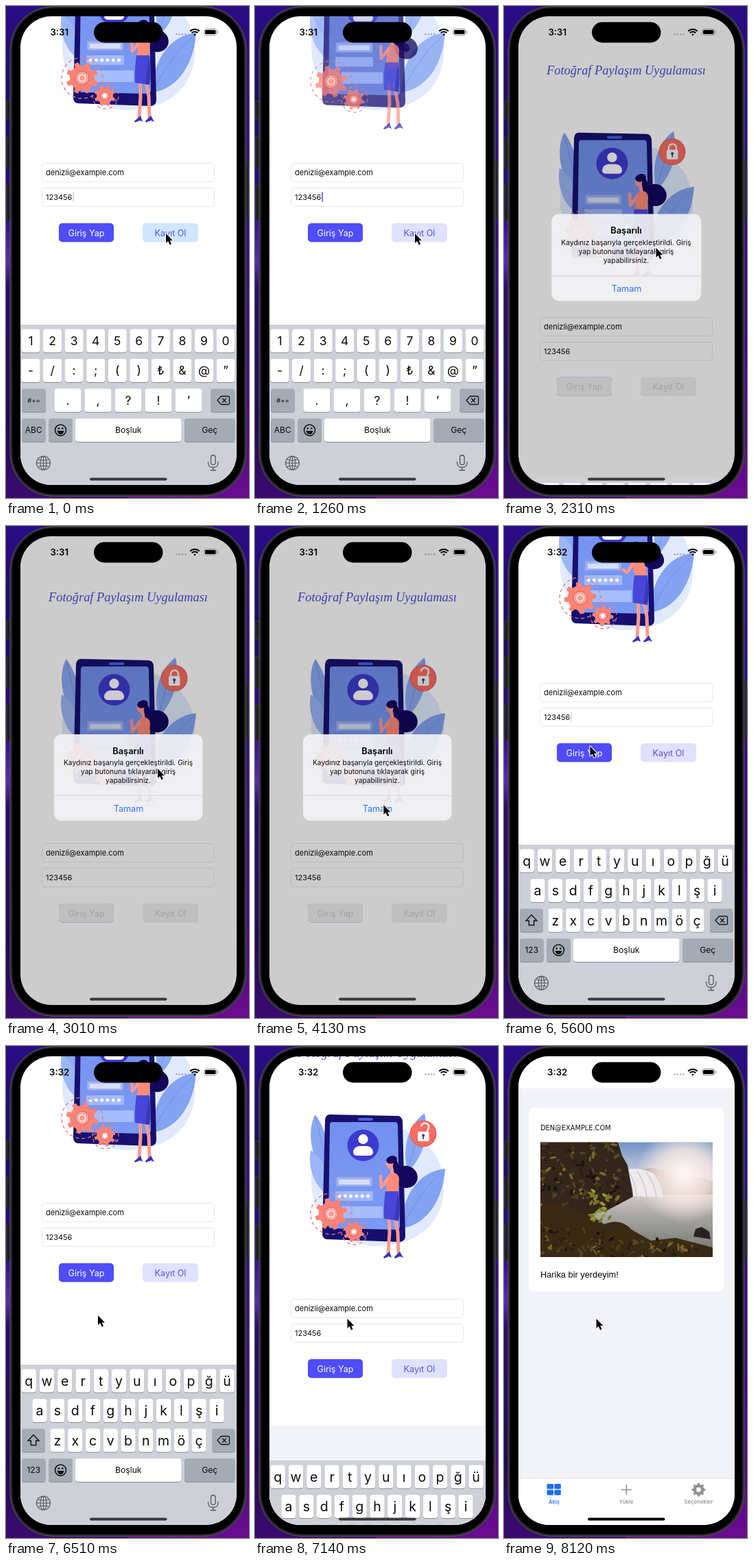
An HTML page with a canvas that plays this animation: 354x718 px, repeating every 8190 ms.

```html
<!DOCTYPE html>
<html lang="tr">
<head>
<meta charset="utf-8">
<title>Giriş</title>
<style>
html, body { margin: 0; width: 100%; height: 100%; overflow: hidden; background: #14063f; }
canvas { display: block; width: 354px; height: 718px; }
</style>
</head>
<body>
<canvas id="c"></canvas>
<script>
const W = 354, H = 718, LOOP = 8190, TRAVEL = 234;
const ALERT_IN = 2030, ALERT_OUT = 4684, LEAVE = 7028, FEED_IN = 7082, CARD = 7490, PHOTO = 7630;
const canvas = document.getElementById('c');
const dpr = window.devicePixelRatio || 1;
canvas.width = W * dpr;
canvas.height = H * dpr;
const g = canvas.getContext('2d');

const clamp = v => Math.max(0, Math.min(1, v));
const ramp = (t, a, b) => clamp((t - a) / (b - a));
const smooth = (t, a, b) => { const k = ramp(t, a, b); return k * k * (3 - 2 * k); };
const mix = (a, b, k) => a + (b - a) * k;
// share of the way still to go, ms after the start
const spring = ms => { const u = Math.max(0, ms) * 0.018; return (1 + u) * Math.exp(-u); };

function paint(fill, stroke, lw = 1) {
  if (fill) { g.fillStyle = fill; g.fill(); }
  if (stroke) { g.strokeStyle = stroke; g.lineWidth = lw; g.stroke(); }
}
function box(x, y, w, h, r, fill, stroke, lw = 1) {
  g.beginPath();
  g.roundRect(x, y, w, h, r);
  paint(fill, stroke, lw);
}
function shape(d, fill, stroke, lw = 1) {
  const p = new Path2D(d);
  if (fill) { g.fillStyle = fill; g.fill(p); }
  if (stroke) { g.strokeStyle = stroke; g.lineWidth = lw; g.stroke(p); }
}
function oval(x, y, rx, ry, fill, stroke, lw = 1, rot = 0) {
  g.beginPath();
  g.ellipse(x, y, rx, ry, rot, 0, 7);
  paint(fill, stroke, lw);
}
const disc = (x, y, r, fill, stroke, lw) => oval(x, y, r, r, fill, stroke, lw);
// y is the middle of the capitals
function text(s, x, y, size, color, align = 'center', weight = 400, font = 'Inter, sans-serif') {
  g.font = `${weight} ${size}px ${font}`;
  g.textAlign = align;
  g.fillStyle = color;
  g.fillText(s, x, y + size * 0.36);
}
function at(x, y, draw) {
  g.save();
  g.translate(x, y);
  draw();
  g.restore();
}
function limb(points, width, color) {
  g.beginPath();
  points.forEach(p => g.lineTo(p[0], p[1]));
  g.lineCap = g.lineJoin = 'round';
  paint(null, color, width);
  g.lineCap = 'butt';
}
function linear(x0, y0, x1, y1, stops) {
  const s = g.createLinearGradient(x0, y0, x1, y1);
  stops.forEach(([p, c]) => s.addColorStop(p, c));
  return s;
}

function gear(x, y, r, teeth, rot, fill) {
  g.beginPath();
  for (let i = 0; i < teeth; i++) {
    [[-.27, .78], [-.17, 1], [.17, 1], [.27, .78]].forEach(([o, k]) => {
      const a = rot + (i + o) / teeth * 2 * Math.PI;
      g.lineTo(x + Math.cos(a) * r * k, y + Math.sin(a) * r * k);
    });
  }
  g.closePath();
  paint(fill);
}
function dashedRing(x, y, r, rot) {
  at(x, y, () => {
    g.rotate(rot);
    g.setLineDash([5, 4]);
    disc(0, 0, r, null, '#e07a80', 1.3);
    g.setLineDash([]);
  });
}

function woman(t) {
  const k = smooth(t, 4150, 4650) * (1 - smooth(t, 5100, 5900));
  const p = (x0, y0, x1, y1) => [mix(x0, x1, k), mix(y0, y1, k)];
  const skin = '#fb9a92', navy = '#13065c', orange = '#ff8b78';
  const head = p(197, 29, 166, 40), crown = p(200, 26, 174, 35), neck = p(200, 44, 178, 48);
  const chest = p(201, 54, 183, 56), waist = [200, 72], nape = p(207, 42, 194, 35);
  const hand = p(183, 49 + Math.sin(t / 350), 154, 95);
  const elbow = p(184, 66, 168, 73), tail = p(220, 51, 209, 42);

  limb([[195, 105], [196, 132], [194, 162]], 5, skin);
  limb([[203, 105], [208, 132], [209, 162]], 5, skin);
  shape('M196 160L187 168L188 170L195 167L199 169Z', '#3532bd');
  shape('M211 160L203 168L204 170L211 167L216 169Z', '#3532bd');
  oval(...tail, 17, mix(16, 11, k), navy, null, 1, .4);
  limb([crown, nape, tail], 11, navy);
  limb([chest, waist], 18, orange);
  shape('M190 72L209 72Q212 96 209 115L188 112Q187 90 190 72Z', '#4747d9');
  shape('M208 74Q212 96 209 115L203 114Z', '#3937bb');
  limb([p(194, 53, 177, 54), elbow, hand], 4.5, skin);
  limb([head, neck], 5, skin);
  oval(head[0] - 1, head[1] + 2, 5.5, 7, skin);
  oval(crown[0] - 1, crown[1], 8, 5.5, navy, null, 1, -.3);
}

function lock(t) {
  const open = smooth(t, 3700, 4250) + (t < 980 ? 1 : 0);
  disc(245, -12, 19.5, '#fa6d60');
  g.setLineDash([2, 2]);
  disc(245, -12, 18.5, null, '#b84a58', 1);
  g.setLineDash([]);
  at(251, -14 - 2 * open, () => {
    g.rotate(open * .45);
    shape('M0 1V-4A5.5 5.5 0 0 0 -11 -4V' + (open > .3 ? -2 : 1), null, '#f3f3fa', 2.4);
  });
  box(237, -15, 16.5, 14, 2, '#f6f6fb');
  disc(245.2, -9.5, 2, '#3b3a70');
  box(244.4, -9, 1.6, 5, 0, '#3b3a70');
}

function illustration(t) {
  const intro = ramp(t, 980, 1380);
  const live = t >= 980;
  const rise = live ? 16 * (1 - smooth(t, 980, 1680)) : 0;
  const spin = live ? Math.min(t, 7490) * .0004 : .4;
  g.save();
  shape('M82 62C80 12 120 -26 178 -24C238 -26 279 18 275 72C272 122 232 150 184 152C126 154 84 116 82 62Z', '#e1eafd');
  if (live) g.globalAlpha = .15 + .85 * intro;

  shape('M88 -40C75 -20 80 32 108 48C112 10 102 -20 88 -40Z', '#8aa8f2');
  shape('M81 12C76 42 90 72 112 80C110 46 100 24 81 12Z', '#9bb5f6');
  shape('M247 -42C222 -24 214 10 222 44C246 22 254 -12 247 -42Z', '#8aa8f2');
  shape('M277 39C244 42 214 72 213 126C250 122 274 84 277 39Z', '#83a2f1');
  shape('M272 45Q240 72 215 123M88 -36Q98 0 106 44M246 -38Q232 4 223 40', null, '#6a8ae4', .8);

  at(0, rise * .25, () => {
    shape('M109 -40L207 -38Q214 -38 215 -30L219 137Q219 145 211 146L104 142Q98 141 98 133L102 -32Q103 -40 109 -40Z', '#17106f');
    shape('M113 -29L204 -29Q208 -29 208 -24L211 123Q211 128 206 128L111 126Q107 126 107 121L109 -25Q109 -29 113 -29Z',
      linear(0, -30, 0, 127, [[0, '#7390ee'], [1, '#7b9af4']]));
    box(150, -35, 22, 4, 2, '#4c5fe0');
    disc(157.5, 5, 23, '#3d3bcf');
    disc(157.5, -4, 7.2, '#fff');
    box(143, 6, 29, 14, [11, 11, 6, 6], '#fff');
    box(118, 51, 53, 14, 1, '#9fb4f8', '#8c9bdc', 1.5);
    box(122, 55, 45, 7, 0, '#d6def9');
    box(117, 72, 55, 14, 1, '#a3b8f8');
    const dots = live ? Math.floor(ramp(t, 3000, 4000) * 6) : 6;
    for (let i = 0; i < dots; i++) disc(123 + i * 8.3, 79, 2.5, '#fff');
    box(126, 94, 60, 17, 1, '#a7bcfa');
    disc(160, 138, 2, '#5060dd');
  });

  at(0, rise * .5, () => {
    dashedRing(111, 105, 30, spin);
    dashedRing(145, 131, 19, -spin);
    gear(111, 105, 23.5, 8, spin, '#ff8275');
    disc(111, 105, 10, '#f3a49d', '#d95d5f', 1);
    disc(111, 105, 5, '#ff9c90', '#fff', 1.2);
    gear(144, 131, 15.5, 8, -spin, '#ff8275');
    disc(144, 131, 6.5, '#f3a49d', '#d95d5f', 1);
    disc(144, 131, 3, '#fff');
  });
  at(0, rise, () => woman(t));
  lock(t);
  g.restore();
}

function caretAlpha(t) {
  if (t > ALERT_IN && t < ALERT_OUT || t > LEAVE) return 0;
  const p = (t + 100) % 700;
  return p < 350 ? 1 - ramp(p, 0, 140) : ramp(p, 350, 490);
}

function button(x, w, label, fill, ink, grey) {
  box(x, 317, w, 27.5, 5, fill);
  text(label, x + w / 2, 331, 12.6, ink);
  if (!grey) return;
  g.save();
  g.globalAlpha = grey;
  box(x, 317, w, 27.5, 5, '#eee');
  text(label, x + w / 2, 331, 12.6, '#cacaca');
  g.restore();
}

function login(t, grey) {
  box(21, -260, 315, 1200, 0, '#fff');
  text('Fotoğraf Paylaşım Uygulaması', 178, -131, 18.4, '#4a4bd8', 'center', 'italic 400', '"Liberation Serif", serif');
  illustration(t);
  [['denizli@example.com', 229], ['123456', 265]].forEach(([s, y]) => {
    box(52.5, y + .5, 251, 27, 4.5, '#fff', '#e9e9ec');
    text(s, 58, y + 14, 11, '#0a0a0a', 'left');
  });
  g.globalAlpha = caretAlpha(t);
  box(97.3, 271.5, 1.4, 14.5, .7, '#4543f0');
  g.globalAlpha = 1;
  const k = ramp(t, 70, 420);
  button(77, 80, 'Giriş Yap', '#4f4cfa', '#fff', grey);
  button(199, 81, 'Kayıt Ol', `rgb(${mix(207, 224, k)},${mix(230, 224, k)},255)`, '#5654d6', grey);
}

function alertBox(alpha, scale) {
  g.save();
  g.globalAlpha = alpha;
  g.translate(178, 367);
  g.scale(scale, scale);
  g.translate(-178, -367);
  box(70, 304, 216.5, 126, 11, 'rgba(243,243,246,.91)');
  text('Başarılı', 178, 328, 12.8, '#000', 'center', 600);
  ['Kaydınız başarıyla gerçekleştirildi. Giriş', 'yap butonuna tıklayarak giriş', 'yapabilirsiniz.']
    .forEach((s, i) => text(s, 178, 345.5 + i * 12.9, 10.2, '#0b0b0b'));
  box(70, 393.4, 216.5, .7, 0, '#c4c4c9');
  text('Tamam', 178.5, 412, 12.6, '#2f74ee');
  g.restore();
}

function key(x, y, w, label, size = 18, grey = false) {
  box(x, y + 1, w, 34, 4, '#898c92');
  box(x, y, w, 34, 4, grey ? '#a5abb5' : '#fff');
  if (label) text(label, x + w / 2, y + 17, size, '#0a0a0a');
}
function row(chars, first, pitch, w, y, size) {
  [...chars].forEach((c, i) => key(first + i * pitch - w / 2, y, w, c, size));
}

function keyboard(letters) {
  box(21, 465, 315, 300, 0, '#cdd0d7');
  if (letters) {
    row('qwertyuıopğü', 33.3, 26.25, 21.2, 471.5, 19.5);
    row('asdfghjklşi', 49, 25.8, 21.2, 515, 19.5);
    row('zxcvbnmöç', 75, 25.75, 21.2, 558.5, 19.5);
    key(23, 558.5, 34, '', 0, true);
    shape('M40 567.5L48 576H43.7V582.5H36.3V576H32Z', null, '#111', 1.4);
  } else {
    row('1234567890', 36, 31.56, 27, 471.5, 17.5);
    row('-/:;()₺&@”', 36, 31.56, 27, 515, 17.5);
    row('.,?!’', 90, 44, 39, 558.5, 17.5);
    key(23, 558.5, 35, '#+=', 9.5, true);
  }
  key(letters ? 300 : 298, 558.5, letters ? 33.5 : 35.5, '', 0, true);
  shape('M308 575.5L313.5 569.5H324Q325.5 569.5 325.5 571V580Q325.5 581.5 324 581.5H313.5ZM315 572.5L321 578.5M321 572.5L315 578.5', null, '#111', 1.3);
  key(23, 602, 34.5, letters ? '123' : 'ABC', 12, true);
  key(62, 602, 35, '', 0, true);
  disc(79.5, 619, 8, null, '#0a0a0a', 1.5);
  disc(76.7, 616.5, 1.3, '#0a0a0a');
  disc(82.3, 616.5, 1.3, '#0a0a0a');
  shape('M74.5 620H84.5Q83.5 625 79.5 625Q75.5 625 74.5 620Z', '#0a0a0a');
  key(101, 602, 154.5, 'Boşluk', 12.2);
  key(260, 602, 73.5, 'Geç', 12.2, true);

  const ink = '#54575d';
  disc(54.5, 667, 10, null, ink, 1.2);
  oval(54.5, 667, 4.5, 10, null, ink, 1.1);
  shape('M44.5 667H64.5M54.5 657V677M46.5 661.5Q54.5 665 62.5 661.5M46.5 672.5Q54.5 669 62.5 672.5', null, ink, 1.1);
  box(298.5, 655.5, 6.5, 14, 3.2, null, ink, 1.3);
  shape('M294.5 665V667Q295 673.5 301.7 673.5Q308.5 673.5 309 667V665M301.7 673.5V677.5M297.5 677.5H306', null, ink, 1.3);
}

function photo() {
  g.save();
  g.beginPath();
  g.rect(53, 140.5, 251, 167.5);
  g.clip();
  box(53, 140, 251, 90, 0, linear(0, 140, 0, 215, [[0, '#6f92c6'], [.5, '#b6c2d6'], [1, '#e6dcd8']]));
  shape('M176 184L215 178L304 196V225H176Z', '#a58c80');
  box(53, 217, 251, 91, 0, linear(0, 217, 0, 300, [[0, '#d2cac6'], [.4, '#a5a4a3'], [1, '#77786f']]));
  const mist = g.createRadialGradient(262, 188, 6, 262, 188, 70);
  mist.addColorStop(0, 'rgba(255,246,242,.98)');
  mist.addColorStop(.5, 'rgba(246,232,226,.8)');
  mist.addColorStop(1, 'rgba(246,232,226,0)');
  box(190, 140, 114, 125, 0, mist);
  shape('M174 181Q200 176 218 186Q230 202 232 221L188 219Q188 196 174 181Z', '#eeeaec');
  shape('M182 184Q192 200 193 219M194 183Q205 198 208 220M207 184Q219 200 222 220', null, '#c8cad2', 1.5);
  shape('M53 140H166L172 160L180 174L184 196L188 220L150 240L53 262Z', '#33261a');
  shape('M53 235Q76 222 98 238Q128 246 146 260Q170 250 186 268L214 284L250 280L304 294V308H53Z', '#3a2a14');
  shape('M276 278L279 267L288 264L299 271L301 282Z', '#25221f');
  let seed = 7;
  const rnd = () => (seed = seed * 16807 % 2147483647) / 2147483647;
  const tones = ['#57452b', '#1c140b', '#7d6530', '#4d4019', '#2a1e11'];
  for (let i = 0; i < 280; i++) {
    const up = i % 2, x = 53 + rnd() * (up ? 116 : 235);
    const y = up ? 142 + rnd() * 90 : 258 + (x - 53) * .14 + rnd() * 46;
    oval(x, y, 1 + rnd() * 5, .7 + rnd() * 2, tones[i % 5], null, 1, rnd() * 3);
  }
  for (let i = 0; i < 26; i++) {
    oval(125 + rnd() * 30, 210 + rnd() * 48, 4, 2, i % 3 ? '#777a26' : '#9b9c3c', null, 1, rnd() * 3);
  }
  g.restore();
}

function feed(t) {
  box(21, 15, 315, 700, 0, '#fff');
  box(21, 62, 315, 569, 0, '#f2f2f9');
  if (t >= CARD) {
    box(36, 90, 284, 268.5, 8, '#fff');
    text('DEN@EXAMPLE.COM', 53, 119.5, 9.8, '#111', 'left', 400, '"DejaVu Sans", sans-serif');
    text('Harika bir yerdeyim!', 53, 333.5, 12.8, '#050505', 'left', 400, '"Liberation Sans", sans-serif');
    if (t >= PHOTO) photo();
  }
  box(21, 630.5, 315, .7, 0, '#dcdce0');
  const blue = '#1c6cf0', grey = '#8f8f94';
  for (let i = 0; i < 4; i++) box(62.5 + i % 2 * 10.8, 639 + (i >> 1) * 8.8, 9.6, 7.6, 1.6, blue);
  shape('M178.3 640V655M170.8 647.5H185.8', null, grey, 1.5);
  gear(283.5, 647.5, 10, 8, 0, grey);
  disc(283.5, 647.5, 3.4, '#fff');
  text('Akış', 73, 665.5, 7.8, blue, 'center', 500);
  text('Yükle', 178, 665.5, 7.8, grey, 'center', 500);
  text('Seçenekler', 283.5, 665.5, 7.8, grey, 'center', 500);
}

function statusBar(t) {
  box(128, 23.5, 100.5, 30, 15, '#000');
  text(t < 4400 ? '3:31' : '3:32', 77.7, 38.5, 13.2, '#050505', 'center', 600);
  for (let i = 0; i < 4; i++) disc(248.5 + i * 4.3, 41.3, 1.3, 'rgba(90,90,95,.45)');
  [2.5, 6, 9.5].forEach((r, i) => {
    g.beginPath();
    g.arc(275, 43.5, r, -Math.PI * .75, -Math.PI * .25);
    if (i) paint(null, '#000', 2.2);
    else { g.lineTo(275, 43.5); paint('#000'); }
  });
  box(288.5, 33.5, 18.5, 9, 3, null, '#8f8f92', 1);
  box(290, 35, 15.5, 6, 1.6, '#000');
  box(308, 36.5, 1.2, 3.2, .6, '#8f8f92');
}

function backdrop() {
  box(0, 0, 177, H, 0, linear(0, 0, 0, H,
    [[0, '#2a0c88'], [.22, '#1c0a64'], [.42, '#2e0e86'], [.52, '#5a2cb0'], [.57, '#2a0d70'], [.85, '#200a55'], [1, '#3c0a70']]));
  box(177, 0, 177, H, 0, linear(0, 0, 0, H,
    [[0, '#2c0c82'], [.3, '#300c86'], [.6, '#390c88'], [.85, '#4c0c88'], [1, '#6c0c8e']]));
  [[1, 138, 28], [1, 190, 47], [1, 260, 53], [346, 226, 86]].forEach(([x, y, h]) =>
    box(x, y, 7, h, 2, '#1d1d20', '#3d3d42', .8));
  box(6, .5, 344, 715, 63, '#2b2b2e', '#55555a', 1);
  box(9, 3, 338, 709.5, 60, '#000', '#161618', 1);
}

const PATH = [[0, 233, 332], [1700, 233, 332], [2400, 221, 354], [3600, 221, 354], [4300, 181.5, 416.5],
  [4950, 181.5, 416.5], [5450, 125.5, 321.5], [6000, 125.5, 321.5], [6600, 134.5, 398], [LOOP, 134.5, 398]];
function pointer(t) {
  const i = PATH.findIndex(p => p[0] > t);
  const a = PATH[i - 1], b = PATH[i], k = smooth(t, a[0], b[0]);
  at(mix(a[1], b[1], k), mix(a[2], b[2], k), () => {
    g.lineJoin = 'round';
    const d = 'M0 0V14L3.2 11L5.6 16.4L8 15.3L5.7 10.2H10Z';
    shape(d, null, '#fff', 2);
    shape(d, '#000');
  });
}

function keyboardOffset(t) {
  if (t < ALERT_IN) return 0;
  if (t < ALERT_OUT) return TRAVEL * (1 - spring(t - ALERT_IN));
  if (t < LEAVE) return TRAVEL * spring(t - ALERT_OUT);
  return TRAVEL * (1 - spring(t - LEAVE));
}

function draw(t) {
  g.setTransform(dpr, 0, 0, dpr, 0, 0);
  backdrop();
  g.save();
  g.beginPath();
  g.roundRect(21, 15, 315, 684, 45);
  g.clip();

  const off = keyboardOffset(t);
  const shown = ramp(t, ALERT_IN, ALERT_IN + 250) * (1 - ramp(t, ALERT_OUT, ALERT_OUT + 260));
  at(0, off, () => login(t, shown * shown));
  if (shown) {
    box(21, 15, 315, 684, 0, `rgba(0,0,0,${.2 * shown})`);
    alertBox(shown, 1 + .18 * spring(t - ALERT_IN));
  }
  if (t >= FEED_IN) at(0, 684 * spring(t - FEED_IN), () => feed(t));
  if (off < TRAVEL - 2) at(0, off, () => keyboard(t >= ALERT_OUT));
  statusBar(t);
  box(122, 688.5, 112.5, 4, 2, t >= CARD ? '#000' : '#39393c');
  g.restore();
  pointer(t);
}

const start = performance.now();
function tick() {
  const t = (performance.now() - start) % LOOP;
  draw(Math.floor(t / 70) * 70);
  requestAnimationFrame(tick);
}
tick();
</script>
</body>
</html>
```
